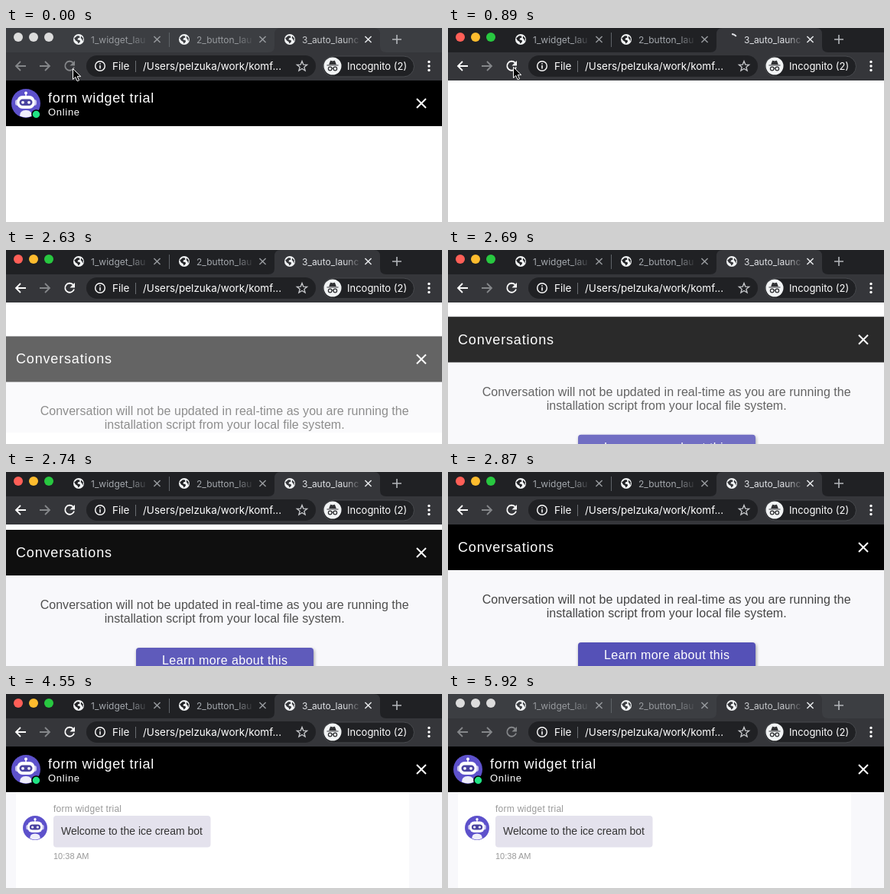
Write an HTML page that moves like this. It is 570x255 px and loops after 5950 ms.

```html
<!DOCTYPE html>
<html lang="en">
<head>
<meta charset="utf-8">
<title>Chat widget reload</title>
<style>
  html, body { margin: 0; width: 100%; height: 100%; overflow: hidden; background: #fff; }
  svg { display: block; width: 570px; height: 255px; font-family: "Liberation Sans", Arial, sans-serif; }
  .ui { font-family: Inter, Roboto, sans-serif; fill: #fff; }
  .line { fill: none; stroke: #fff; stroke-width: 1.8; }
  .strip { fill: var(--strip); }
  .bar { fill: #35363a; }
  .pill { fill: #202124; }
  .nav { stroke: var(--nav); }
  .dim { stroke: #85878a; }
  .big { font-size: 18px; fill: #fff; }
</style>
</head>
<body>
<svg id="stage" viewBox="0 0 570 255">
  <defs>
    <linearGradient id="fade" gradientUnits="userSpaceOnUse" x1="52" x2="76">
      <stop offset="0" stop-color="var(--tab)"/>
      <stop offset="1" stop-color="var(--tab)" stop-opacity="0"/>
    </linearGradient>
    <linearGradient id="fadeOn" gradientUnits="userSpaceOnUse" x1="56" x2="78">
      <stop offset="0" stop-color="var(--tabOn)"/>
      <stop offset="1" stop-color="var(--tabOn)" stop-opacity="0"/>
    </linearGradient>
    <filter id="shadow" x="-10%" y="-30%" width="120%" height="180%">
      <feDropShadow dx="1" dy="2" stdDeviation="2" flood-opacity=".4"/>
    </filter>
    <clipPath id="pageClip"><rect id="pageRect" y="69" width="570" height="186"/></clipPath>
    <path id="cross" d="M-6 -6 6 6M6 -6 -6 6"/>
    <g id="globe">
      <circle r="7" fill="#f1f3f4"/>
      <path d="M-5.8-1.5 L-2-4.8 1-4.5 1.5-2.5 -1-1.5 -1.5 .5 1.5 1 2 3 -.5 5.5 -1.5 3 -4 1.5zM3.2-4.5 5.8-1.5 5.5 2.5 4-.5 2.8-1.8z"/>
    </g>
    <g id="bot">
      <circle r="19" fill="#5d51cb"/>
      <path d="M0-9V-13" stroke="#fff" stroke-width="1.5"/>
      <circle cy="-13.5" r="2" fill="#fff"/>
      <rect x="-14" y="-5" width="28" height="8" rx="3" fill="#c9c5ee"/>
      <rect x="-11.5" y="-10" width="23" height="17" rx="7" fill="#fff"/>
      <rect x="-8.5" y="-5.5" width="17" height="8.5" rx="4.2" fill="#4a43a0"/>
      <circle cx="-4" cy="-1.2" r="1.9" fill="#fff"/>
      <circle cx="4" cy="-1.2" r="1.9" fill="#fff"/>
      <path d="M-8 16.5Q-8 9 0 9T8 16.5Q0 20.5-8 16.5z" fill="#eeedfa"/>
    </g>
  </defs>

  <rect width="570" height="255" fill="#fff"/>

  <g clip-path="url(#pageClip)">
    <g id="panel">
      <rect y="69" width="570" height="240" fill="#f8f8fb"/>
      <rect y="69" width="570" height="60"/>
      <text class="big" x="13" y="105" letter-spacing=".83">Conversations</text>
      <use href="#cross" class="line" x="543" y="99" style="stroke-width:2"/>
      <g font-size="16" fill="#444" text-anchor="middle" letter-spacing=".04">
        <text x="285.7" y="173">Conversation will not be updated in real-time as you are running the</text>
        <text x="285.7" y="191">installation script from your local file system.</text>
      </g>
      <rect x="170" y="224" width="232" height="42" rx="4" fill="#5551b7" filter="url(#shadow)"/>
      <text x="204" y="246" font-size="16" fill="#fff" letter-spacing=".42">Learn more about this</text>
    </g>
  </g>

  <path id="sides" d="M0 129H13V255H0zM527 129H570V255H527z" fill="#f8f8fb"/>
  <g id="header">
    <rect y="69" width="570" height="60"/>
    <use href="#cross" class="line" x="543" y="99" style="stroke-width:2"/>
  </g>
  <g id="loading" fill="#333">
    <circle cx="26" cy="99" r="19"/>
    <rect x="55" y="86" width="125" height="11" rx="2"/>
    <rect x="55" y="104" width="60" height="9" rx="2"/>
  </g>
  <g id="profile">
    <use href="#bot" x="26" y="99"/>
    <circle cx="39.5" cy="113.5" r="5.5" fill="#20e384" stroke="#000" stroke-width="1.6"/>
    <text class="big" x="55" y="98" letter-spacing=".7">form widget trial</text>
    <text x="55" y="115" font-size="13" fill="#fff" letter-spacing=".7">Online</text>
  </g>
  <g id="message">
    <use href="#bot" transform="translate(38 176) scale(.84)"/>
    <text x="62" y="155" font-size="12" fill="#999" letter-spacing=".27">form widget trial</text>
    <rect x="62" y="160" width="205.500" height="41.500" rx="4" fill="#e4e2ed"/>
    <text x="72" y="185" font-size="14" fill="#333">Welcome to the ice cream bot</text>
    <text x="62" y="217" font-size="11" fill="#999">10:38 AM</text>
  </g>

  <g class="ui">
    <rect class="strip" width="570" height="32"/>
    <path class="bar" d="M0 32H343Q351 32 351 24V8Q351 0 359 0H481Q489 0 489 8V24Q489 32 497 32H570V69H0z"/>
    <circle cx="16" cy="12" r="6" fill="var(--red)"/>
    <circle cx="36" cy="12" r="6" fill="var(--amber)"/>
    <circle cx="56" cy="12" r="6" fill="var(--green)"/>
    <g id="tabs"></g>
    <path d="M213.500 6V25" class="line" style="stroke:#5f6368;stroke-width:1"/>
    <path d="M505 15H517M511 9V21" class="line" style="stroke:#b4b7bb;stroke-width:1.600"/>
    <path id="spinner" class="line" d="M0-7A7 7 0 0 1 5.700-4" style="stroke:#dfe1e5"/>

    <path class="line nav" d="M26 50H13.500M19 44 13 50 19 56"/>
    <path class="line dim" d="M44 50H56.500M51 44 57 50 51 56"/>
    <path class="line nav" d="M87.500 45.500A6 6 0 1 0 89 51.500"/>
    <path d="M90 43V49.500H83.500z" fill="var(--nav)"/>

    <rect class="pill" x="105" y="36" width="300" height="28" rx="14"/>
    <circle class="line" cx="123" cy="50" r="6.300" style="stroke-width:1.400"/>
    <path class="line" d="M123 49V53.500M123 46.200V47.700" style="stroke-width:1.500"/>
    <text x="139" y="55" font-size="13.500">File</text>
    <path class="line" d="M169.500 43V58" style="stroke:#6a6d71;stroke-width:1"/>
    <text x="179" y="55" font-size="13.500">/Users/pelzuka/work/komf...</text>
    <path id="star" class="line" style="stroke:#c8cacd;stroke-width:1.300"/>

    <rect class="pill" x="414.500" y="37" width="119" height="27" rx="13.500" stroke="#494b4f"/>
    <circle cx="427" cy="50" r="11.500" fill="#f1f3f4"/>
    <g fill="#303134" stroke="#303134">
      <path d="M423 47.500 424.500 43.500 427 44.200 429.500 43.500 431 47.500zM419.500 49H434.500" stroke-width="1.200"/>
      <g fill="none" stroke-width="1.300">
        <circle cx="423.700" cy="53.500" r="2.300"/>
        <circle cx="430.300" cy="53.500" r="2.300"/>
        <path d="M426 53Q427 52.400 428 53"/>
      </g>
    </g>
    <text x="446" y="55" font-size="13">Incognito (2)</text>
    <circle cx="553" cy="44.500" r="1.700"/>
    <circle cx="553" cy="50" r="1.700"/>
    <circle cx="553" cy="55.500" r="1.700"/>
  </g>

  <path id="cursor" d="M0 0V14L3.300 11 5.600 16.300 8 15.300 5.700 10.200H10.300z" stroke="#fff" stroke-linejoin="round"/>
</svg>

<script>
const LOOP = 5950;
const $ = id => document.getElementById(id);
const show = (id, on) => $(id).style.display = on ? '' : 'none';
const clamp = x => Math.max(0, Math.min(1, x));

// Each colour: [window inactive, window active]
const colours = {
  strip: ['#3c3e42', '#202124'], nav: ['#85878a', '#ffffff'],
  tab: ['#96999d', '#a3a7ac'], tabOn: ['#c6c8cb', '#dfe1e5'],
  red: ['#dcdcdc', '#ff5f57'], amber: ['#dcdcdc', '#febc2e'], green: ['#dcdcdc', '#28c840']
};
const rgb = hex => [1, 3, 5].map(i => parseInt(hex.slice(i, i + 2), 16));
const mix = (a, b, k) => {
  const to = rgb(b);
  return `rgb(${rgb(a).map((v, i) => Math.round(v + (to[i] - v) * k))})`;
};

$('tabs').innerHTML = ['1_widget_lau', '2_button_lau', '3_auto_launc'].map((title, i) => {
  const on = i === 2;
  return `<g transform="translate(${95 + 138 * i} 15)">
    <use href="#globe" ${on ? 'id="icon"' : ''} class="${on ? 'bar' : 'strip'}"/>
    <text transform="translate(16 4.500)" font-size="12" fill="url(#${on ? 'fadeOn' : 'fade'})">${title}</text>
    <use href="#cross" transform="translate(102.500 0) scale(.68)" class="line"
      style="stroke:${on ? '#e8eaed' : '#96999d'};stroke-width:2.200"/></g>`;
}).join('');

$('star').setAttribute('d', 'M' + Array.from({ length: 10 }, (_, i) => {
  const r = i % 2 ? 3 : 7, a = i * Math.PI / 5;
  return `${387 + r * Math.sin(a)} ${50.5 - r * Math.cos(a)}`;
}).join('L') + 'z');

// Pointer path: [time, x, y]
const path = [
  [0, 87.5, 53.5], [90, 87.5, 53.5], [120, 86.5, 51.5], [720, 86.5, 51.5], [800, 85.5, 51.5],
  [1150, 85.5, 51.5], [1290, 119.5, 44.5], [1390, 205, 115], [1490, 345, 257]
];
function pointer(t) {
  const i = path.findIndex(p => p[0] > t);
  if (i < 0) return [345, 300];
  const [a, b] = [path[i - 1], path[i]];
  const k = (t - a[0]) / (b[0] - a[0]);
  return [a[1] + (b[1] - a[1]) * k, a[2] + (b[2] - a[2]) * k];
}

function draw(t) {
  const active = t < 3000 ? clamp((t - 690) / 60) : 1 - clamp((t - 5860) / 60);
  for (const name in colours) $('stage').style.setProperty('--' + name, mix(...colours[name], active));

  const before = t < 800, chat = t >= 2960;
  show('header', before || chat);
  show('profile', before || t >= 3650);
  show('loading', t >= 3170 && t < 3650);
  show('sides', chat);
  show('message', t >= 4550);

  // The panel rises and fades in together
  show('panel', t >= 2630 && !chat);
  const rise = 45 * (1 - clamp((t - 2630) / 240)) ** 3;
  $('panel').setAttribute('transform', `translate(0 ${rise})`);
  $('panel').setAttribute('opacity', 1 - rise / 112);
  $('pageRect').setAttribute('height', t < 2660 ? 171 : 186);

  const busy = t >= 800 && t < 1290;
  show('icon', !busy);
  show('spinner', busy);
  $('spinner').setAttribute('transform', `translate(371 15) rotate(${(t - 890) * .4})`);
  $('cursor').setAttribute('transform', `translate(${pointer(t)})`);
}

const start = performance.now();
function tick() {
  draw((performance.now() - start) % LOOP);
  requestAnimationFrame(tick);
}
tick();
</script>
</body>
</html>
```
